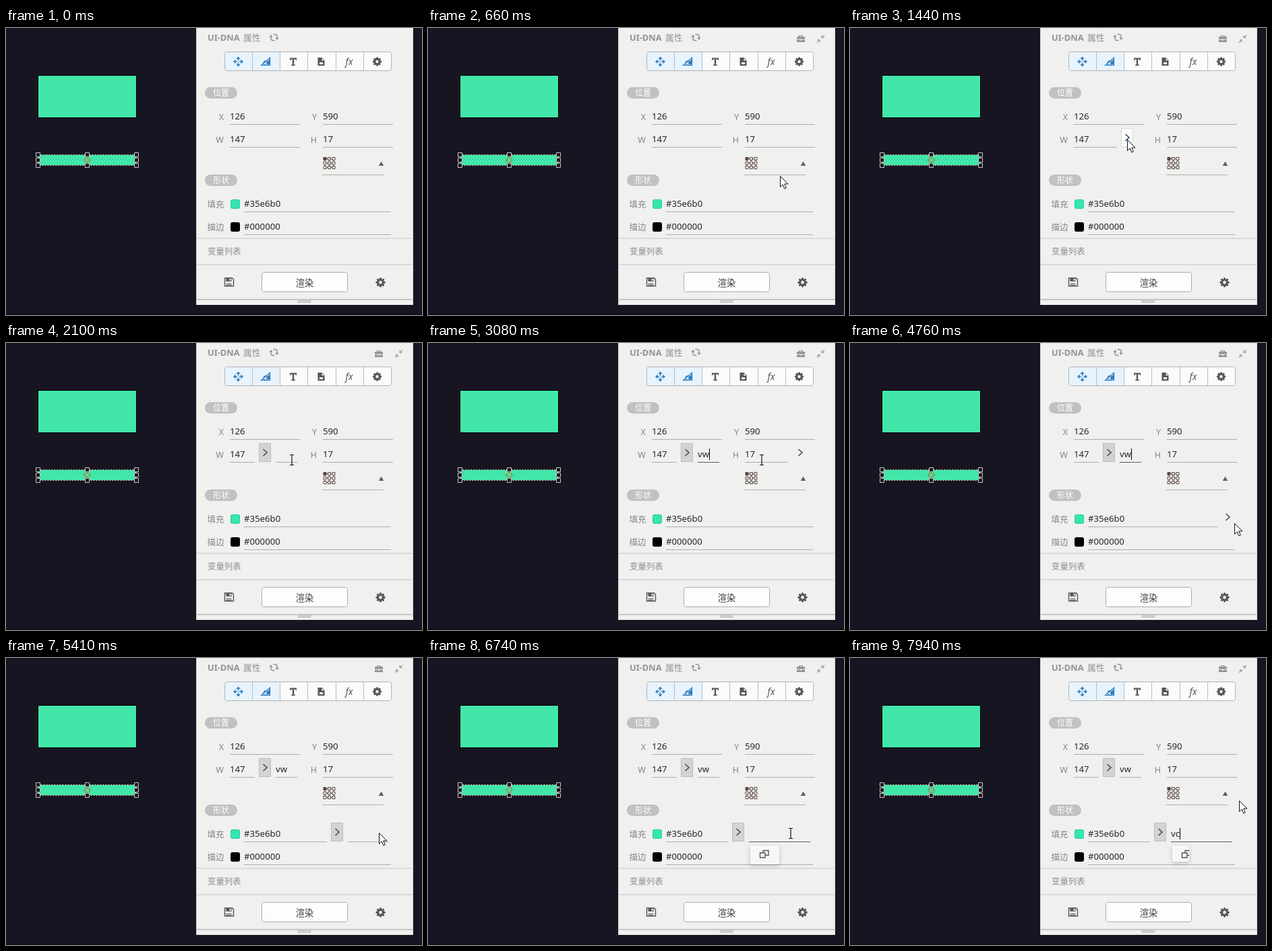
Recreate the animation shown at these times as an HTML page with a canvas. Size 617x427 px, loop 8000 ms.

```html
<!DOCTYPE html>
<html lang="zh">
<head>
<meta charset="utf-8">
<style>
html, body { margin: 0; width: 100%; height: 100%; overflow: hidden; background: #181522; }
canvas { display: block; }
</style>
</head>
<body>
<canvas id="stage" width="617" height="427"></canvas>
<script>
const ctx = document.getElementById('stage').getContext('2d');
const LATIN = '"Noto Sans", "Noto Sans CJK SC", sans-serif';
const CJK = '"Noto Sans CJK SC", "Noto Sans CJK", sans-serif';
const LINE = '#adadad', ICON = '#555';

// Pointer path: time, x, y
const path = [
  [100, 540, 347], [550, 530, 250], [880, 505, 160], [990, 495, 160], [1320, 425, 158],
  [1430, 411, 166], [1760, 411, 164], [1980, 420, 178], [2200, 428, 170], [2420, 440, 185],
  [2640, 575, 190], [2860, 495, 174], [3520, 495, 174], [3630, 488, 200], [3740, 460, 260],
  [3850, 440, 370], [4070, 380, 254], [4290, 400, 262], [4400, 480, 262], [4620, 575, 270],
  [5060, 556, 262], [5280, 553, 260], [5500, 553, 260], [5940, 520, 260], [6380, 522, 261],
  [6490, 538, 261], [7150, 538, 261], [7260, 544, 240], [7480, 560, 222], [7700, 577, 212],
  [8000, 577, 212]
];

const clamp = v => Math.max(0, Math.min(1, v));
const mix = (a, b, p) => a + (b - a) * p;
const easeOut = v => 1 - (1 - clamp(v)) ** 3;

function pointerAt(t) {
  if (t < 100) return { x: -99, y: -99 };
  const step = Math.max(100, Math.floor((t + 30) / 110) * 110);
  const i = Math.max(1, path.findIndex(k => k[0] >= step));
  const [a, b] = [path[i - 1], path[i]];
  const p = clamp((step - a[0]) / (b[0] - a[0]));
  return { x: Math.round(mix(a[1], b[1], p)), y: Math.round(mix(a[2], b[2], p)) };
}

function fillBox(x, y, w, h, color, r = 0) {
  ctx.fillStyle = color;
  ctx.beginPath();
  ctx.roundRect(x, y, w, h, r);
  ctx.fill();
}
function strokeBox(x, y, w, h, color, r = 0) {
  ctx.strokeStyle = color;
  ctx.lineWidth = 1;
  ctx.beginPath();
  ctx.roundRect(x + .5, y + .5, w - 1, h - 1, r);
  ctx.stroke();
}
function text(str, x, y, color, font, align = 'left') {
  ctx.fillStyle = color;
  ctx.font = font;
  ctx.textAlign = align;
  ctx.fillText(str, x, y);
  return ctx.measureText(str).width;
}
const value = (str, x, y) => text(str, x, y, '#26262e', '13.2px ' + LATIN);
const label = (str, x, y) => text(str, x, y, '#85858a', '12.5px ' + LATIN, 'right');

// SVG path drawn around a centre point
function shape(x, y, d, { fill, stroke, width = 1, turn = 0 }) {
  const p = new Path2D(d);
  ctx.save();
  ctx.translate(x, y);
  ctx.rotate(turn);
  if (fill) { ctx.fillStyle = fill; ctx.fill(p, 'evenodd'); }
  if (stroke) { ctx.strokeStyle = stroke; ctx.lineWidth = width; ctx.stroke(p); }
  ctx.restore();
}

function gear(x, y, r) {
  for (let i = 0; i < 8; i++)
    shape(x, y, `M-1.5 ${-r}h3v3h-3z`, { fill: ICON, turn: i * Math.PI / 4 });
  ctx.strokeStyle = ICON;
  ctx.lineWidth = r * .42;
  ctx.beginPath();
  ctx.arc(x, y, r * .55, 0, 7);
  ctx.stroke();
}

function anchorGrid(x, y, active, color) {
  for (let i = 0; i < 9; i++) {
    const px = x + i % 3 * 6.5 - 9, py = y + Math.floor(i / 3) * 6.5 - 9;
    if (i === active) fillBox(px, py, 5, 5, color);
    else strokeBox(px, py, 5, 5, color);
    if (i % 3 < 2) fillBox(px + 5, py + 2, 1.5, 1, color);
    if (i < 6) fillBox(px + 2, py + 5, 1, 1.5, color);
  }
}

function drawCanvasShapes() {
  fillBox(0, 0, 617, 427, '#181522');
  fillBox(0, 425, 617, 2, '#100e18');
  fillBox(47, 70, 147, 64, '#000');
  fillBox(48, 71, 145, 62, '#42e6a9');
  fillBox(48, 189, 145, 15, '#42e6a9');
  strokeBox(47, 188, 147, 17, '#111');
  ctx.setLineDash([2, 2]);
  strokeBox(47, 188, 147, 17, '#d8c8b8');
  ctx.setLineDash([]);
  fillBox(50, 190, 1, 13, '#d59a58');
  fillBox(190, 190, 1, 13, '#d59a58');
  for (const x of [47, 120, 193]) for (const y of [188, 196, 204]) {
    if (x === 120 && y === 196) continue;
    fillBox(x - 3, y - 3, 7, 7, '#181522');
    strokeBox(x - 3, y - 3, 7, 7, '#c9c9c9');
  }
  shape(120.5, 196.5, 'M-6 0h4M2 0h4M0-6v4M0 2v4M4 0a4 4 0 1 1-8 0a4 4 0 1 1 8 0', { stroke: '#b0753c' });
}

function drawToolbar() {
  fillBox(324, 35, 248, 29, '#fbfbfb', 3);
  fillBox(325, 36, 81, 27, '#e7f3fd', 2);
  for (const x of [365, 406, 447, 489, 530]) fillBox(x, 35, 1, 29, '#b9bcc0');
  strokeBox(324, 35, 248, 29, '#b0b3b7', 3);
  const blue = '#2f7bbd';
  for (let i = 0; i < 4; i++)
    shape(344.5, 50, 'M0-7.5l3.2 3.6h-6.4zM-.8-4h1.6v2.4h-1.6z', { fill: blue, turn: i * Math.PI / 2 });
  shape(385.5, 50, 'M-7 5.5L6-6V5.5zM3 2a3.2 3.2 0 1 1-6.4 0a3.2 3.2 0 1 1 6.4 0', { stroke: blue, width: 1.2 });
  shape(388, 50, 'M-3 2.500L3.500-4V5z', { fill: blue });
  shape(426, 50, 'M-5-5.500h10v3.500h-1.200l-.6-1.500h-2v8h1.600v1.500h-5.600v-1.500h1.600v-8h-2l-.6 1.500h-1.200z', { fill: ICON });
  shape(467.5, 50, 'M-5-6h6l4 4v8h-10zM1-5v3.500h3.500zM-2.500 1v3h5v-3z', { fill: ICON });
  text('fx', 509, 55, ICON, 'italic 500 13.5px ' + LATIN, 'center');
  gear(550.5, 50, 6.5);
}

function drawPanel(t) {
  fillBox(282, 0, 322, 412, '#f0f0ef');
  fillBox(282, 0, 1, 412, '#d5d5d5');
  fillBox(603, 0, 1, 412, '#d5d5d5');
  fillBox(283, 312, 320, 2, '#dadada');
  fillBox(283, 351, 320, 2, '#dadada');
  fillBox(283, 403, 320, 2, '#c6c6c6');
  for (let x = 433; x < 452; x += 2) fillBox(x, 405, 1, 4, '#aaa');

  text('UI-DNA', 299, 19, '#929298', 'bold 12.8px ' + LATIN);
  text('属性', 352, 19, '#929298', '500 12.8px ' + CJK);
  shape(397.5, 14, 'M-1-4.500h2.500a3 3 0 0 1 3 3v3M1 4.500h-2.500a3 3 0 0 1-3-3v-3', { stroke: '#929298', width: 1.4 });
  shape(397.5, 14, 'M1.800.5h5.400L4.500 4zM-1.800-.5h-5.400L-4.500-4z', { fill: '#929298' });
  if (t >= 100) {
    shape(553, 16, 'M-6-3h3v-2h6v2h3v3.500h-12zM-1.500-3h3v-1h-3zM-6 1.500h4.500v1h3v-1h4.500v3.500h-12z', { fill: '#929298' });
    shape(582.5, 16, 'M1-1h4.500L3.700-2.800L6-5.100L5.100-6L2.800-3.700L1-5.500zM-1 1h-4.500l1.800 1.800L-6 5.100l.9.900l2.300-2.300L-1 5.500z', { fill: '#a0a0a4' });
  }
  drawToolbar();

  for (const [name, y] of [['位置', 88], ['形状', 218]]) {
    fillBox(295, y, 48, 17, '#c1c1c1', 8.5);
    text(name, 319, y + 13, '#fff', '500 12px ' + CJK, 'center');
  }
  label('填充', 323.5, 266.5);
  label('描边', 323.5, 300.5);
  fillBox(333, 255, 14, 14, '#35e6b0', 3);
  strokeBox(333, 255, 14, 14, '#2fcaa0', 3);
  fillBox(333, 289, 14, 14, '#000', 3);
  text('变量列表', 299, 337, '#8b8b90', '500 12.4px ' + CJK);

  fillBox(379, 363, 128, 30, '#fdfdfd', 3);
  strokeBox(379, 363, 128, 30, '#acacac', 3);
  text('渲染', 443, 384, '#3a3a3e', '13.2px ' + CJK, 'center');
  shape(330.5, 378, 'M-6-6h11l2 2v10h-13z', { stroke: ICON, width: 1.4 });
  shape(330.5, 378, 'M-4-6h8v5h-8zM1-5v3h2v-3zM-4 2h8v1h-8zM-4 4h8v1h-8z', { fill: ICON });
  gear(555.5, 378.5, 7);
}

// Input row whose line shortens on hover and splits into value and unit once open
function field(ptr, { name, x, y, w, str, hoverCut, openEnd, open = 0, unit = '', focus, caret }) {
  const over = ptr.x >= x && ptr.x <= x + w && Math.abs(ptr.y - y) < 15;
  const end = open ? mix(w - hoverCut, openEnd, open) : over ? w - hoverCut : w;
  const lineY = y + 12;
  let typing = over && ptr.x < x + end;
  if (name) label(name, x - 9, y + 5.5);
  value(str, x, y + 5);
  fillBox(x, lineY, end, 1, LINE);

  if (open || over) {
    const bx = Math.round(x + end + (hoverCut > 30 && !open ? 9 : 6)) - (hoverCut > 30 && !open && ptr.x < x + w - 10 && ptr.x > x + end ? 3 : 0);
    const hot = over && ptr.x >= bx && ptr.x <= bx + 18;
    if (open || hot) {
      fillBox(bx, y - 16, 18, 28, open ? '#d3d3d3' : '#fdfdfd');
      strokeBox(bx, y - 16, 18, 28, open ? '#bdbdbd' : '#d8d8d8');
    }
    shape(bx + 9, y - 2, 'M-2.500-5L3 0L-2.500 5', { stroke: hot && !open ? '#2a5275' : '#4b4b4f', width: 1.6 });
  }
  if (open > .2) {
    const ux = x + end + 31, ue = x + w - 4;
    fillBox(ux, lineY, ue - ux, 1, focus ? '#5c5866' : LINE);
    const tw = value(unit, ux, y + 5);
    if (focus && caret) fillBox(Math.round(ux + tw), y - 8, 1, 17, '#000');
    if (open === 1 && over && ptr.x >= ux) typing = true;
  }
  return typing;
}

function drawFields(t, ptr) {
  const small = { w: 104, hoverCut: 40, openEnd: 37 };
  const wide = { x: 353, w: 218, hoverCut: 26, openEnd: 92 };
  const rows = [
    { ...small, name: 'X', x: 332, y: 131, str: '126' },
    { ...small, name: 'Y', x: 470, y: 131, str: '590' },
    { ...small, name: 'W', x: 332, y: 165, str: '147', open: easeOut((t - 1560) / 320),
      unit: 'vw'.slice(0, (t >= 2860) + (t >= 3080)), focus: t >= 2200 && t < 5290, caret: true },
    { ...small, name: 'H', x: 470, y: 165, str: '17' },
    { ...wide, y: 261, str: '#35e6b0', open: easeOut((t - 5250) / 500),
      unit: 'vc'.slice(0, (t >= 7510) + (t >= 7940)), focus: t >= 5950, caret: t < 6740 || t >= 7170 },
    { ...wide, y: 295, str: '#000000' }
  ];
  return rows.map(row => field(ptr, row)).some(Boolean);
}

function drawAnchorPicker(t) {
  const open = clamp((t - 3530) / 110) * clamp((4090 - t) / 300);
  const turn = Math.PI * clamp((t - 3530) / 200) * clamp((4290 - t) / 440);
  anchorGrid(479.5, 201, 0, '#5a4840');
  fillBox(469, 218, 91, 1, LINE);
  shape(556.5, 202, 'M0-3.500L3.800 3h-7.600z', { fill: '#606066', turn });
  if (!open) return;
  ctx.save();
  ctx.globalAlpha = open;
  ctx.shadowColor = 'rgba(0,0,0,.3)';
  ctx.shadowBlur = 7;
  ctx.shadowOffsetY = 2;
  fillBox(400, 225, 147, 105, '#f5f5f5');
  ctx.shadowColor = 'transparent';
  for (let i = 0; i < 9; i++)
    anchorGrid(424 + i % 3 * 48.5, 239 + Math.floor(i / 3) * 35.5, i, '#5a4840');
  ctx.restore();
}

function drawPopup(t) {
  const show = clamp((t - 5950) / 110);
  if (!show) return;
  const p = t >= 7940 ? 1 : 0;
  const w = mix(43, 25, p), h = mix(28, 24, p);
  ctx.save();
  ctx.globalAlpha = show;
  ctx.shadowColor = 'rgba(0,0,0,.22)';
  ctx.shadowBlur = 6;
  ctx.shadowOffsetY = 2;
  fillBox(478, 279, w, h, '#f7f7f7', 2);
  ctx.shadowColor = 'transparent';
  ctx.beginPath();
  ctx.rect(478, 279, w, h);
  ctx.clip();
  shape(498.5, 292, 'M-1.500-5.500h8v7h-8z', { stroke: ICON, width: 1.4 });
  shape(498.5, 292, 'M-6-2h7.500v7h-7.500z', { fill: '#f7f7f7', stroke: ICON, width: 1.4 });
  ctx.restore();
}

function drawPointer({ x, y }, typing) {
  if (typing) shape(x, y, 'M-3-7.500h2.500l.5.500l.5-.5h2.500M0-7v14M-3 7.500h2.500l.5-.5l.5.500h2.500', { stroke: '#111', width: 1.2 });
  else shape(x + .5, y + .5, 'M0 0V16L3.700 12.500L6.300 18.500L8.800 17.400L6.200 11.500H11.500Z', { fill: '#fff', stroke: '#111' });
}

function draw(now) {
  const t = now % 8000;
  const ptr = pointerAt(t);
  drawCanvasShapes();
  drawPanel(t);
  const typing = drawFields(t, ptr);
  drawAnchorPicker(t);
  drawPopup(t);
  drawPointer(ptr, typing);
  requestAnimationFrame(() => draw(performance.now()));
}
draw(performance.now());
</script>
</body>
</html>
```
